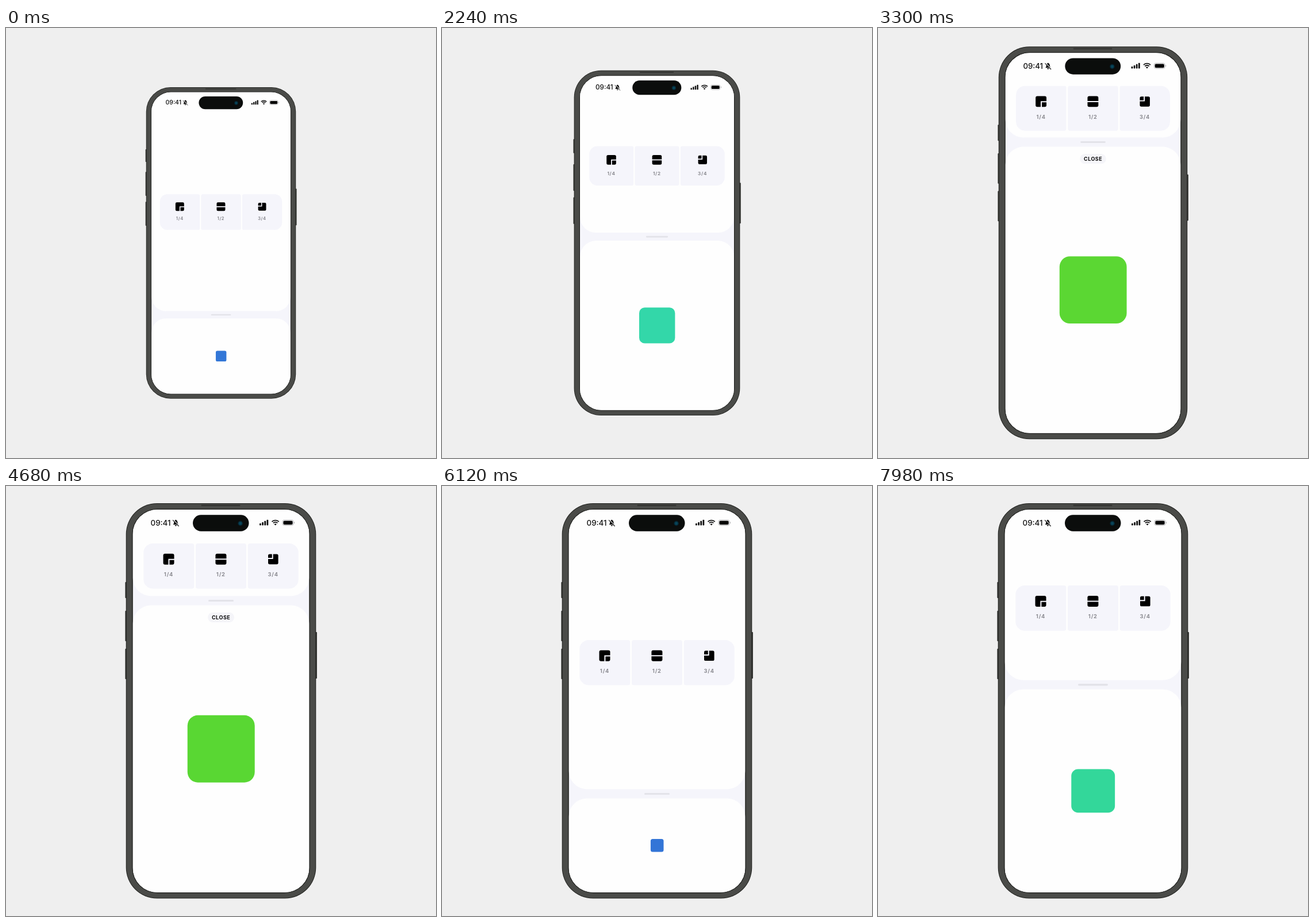
Animation, 748 px wide and 748 px high, one loop 8000 ms. Source, as an HTML page with a canvas:

```html
<!DOCTYPE html>
<html lang="en">
<head>
<meta charset="utf-8">
<title>Split view</title>
<style>
  html, body { margin: 0; width: 100%; height: 100%; overflow: hidden; background: #efefef; }
  canvas { display: block; width: 748px; height: 748px; }
</style>
</head>
<body>
<canvas id="stage"></canvas>
<script>
const SIZE = 748, MID = SIZE / 2, LOOP = 8000;
const canvas = document.getElementById('stage');
const dpr = window.devicePixelRatio || 1;
canvas.width = canvas.height = Math.round(SIZE * dpr);
const ctx = canvas.getContext('2d');

const SCREEN = { x: 220.5, y: 41, w: 307, h: 666 };
const BOTTOM = SCREEN.y + SCREEN.h;
const QUARTER = SCREEN.h * 0.25, HALF = SCREEN.h * 0.5, MOST = SCREEN.h * 0.75;
const TINT = '#f5f5fb', WHITE = '#fefefe';

const clamp = (v, a = 0, b = 1) => Math.min(b, Math.max(a, v));
const lerp = (a, b, p) => a + (b - a) * p;

// Underdamped spring response, time in ms.
function spring(t, stiffness = 500, damping = 30) {
  if (t <= 0) return 0;
  if (t > 500) return 1;
  const w = Math.sqrt(stiffness), z = damping / (2 * w);
  const k = Math.sqrt(1 - z * z), s = t / 1000, a = w * k * s;
  return 1 - Math.exp(-z * w * s) * (Math.cos(a) + z / k * Math.sin(a));
}

const easeOut = (x, power) => 1 - Math.pow(1 - clamp(x), power);

// Smooth curve through [time, value] points.
function curve(points, t) {
  const last = points.length - 1;
  if (t <= points[0][0]) return points[0][1];
  if (t >= points[last][0]) return points[last][1];
  const i = points.findIndex(p => p[0] > t) - 1;
  const slope = j => {
    if (j === 0) return 0;
    const a = points[j - 1], b = points[Math.min(last, j + 1)];
    return (b[1] - a[1]) / (b[0] - a[0]);
  };
  const [t0, v0] = points[i], [t1, v1] = points[i + 1];
  const d = t1 - t0, u = (t - t0) / d, u2 = u * u, u3 = u2 * u;
  return v0 * (2 * u3 - 3 * u2 + 1) + slope(i) * d * (u3 - 2 * u2 + u)
       + v1 * (3 * u2 - 2 * u3) + slope(i + 1) * d * (u3 - u2);
}

const SNAPS = [[1985, QUARTER, HALF], [3017, HALF, MOST], [4700, MOST, HALF], [5847, HALF, QUARTER]];
const DRAG = [[7105, QUARTER], [7200, 185], [7480, 253.5], [7800, 326], [7920, 347], [8000, 355]];

function panelHeight(t) {
  if (t > DRAG[0][0]) return curve(DRAG, t);
  let h = QUARTER;
  for (const [start, from, to] of SNAPS) if (t > start) h = lerp(from, to, spring(t - start));
  return h;
}

function zoom(t) {
  if (t < 2990) return lerp(0.788, 0.905, easeOut((t - 1980) / 500, 1.764));
  return lerp(0.905, 1, easeOut((t - 2980) / 500, 2.6));
}

function hue(h) {
  return h < HALF ? lerp(215, 165, (h - QUARTER) / (HALF - QUARTER))
                  : lerp(165, 106, (h - HALF) / (MOST - HALF));
}

function box(x, y, w, h, r, fill) {
  ctx.beginPath();
  ctx.roundRect(x, y, w, h, r);
  if (fill) { ctx.fillStyle = fill; ctx.fill(); }
}

function line(points, width, color) {
  ctx.beginPath();
  points.forEach(([x, y]) => ctx.lineTo(x, y));
  ctx.lineWidth = width;
  ctx.strokeStyle = color;
  ctx.stroke();
}

function label(text, x, y, font, color, spacing = 0, align = 'center') {
  ctx.font = font + ' Inter, sans-serif';
  ctx.letterSpacing = spacing + 'px';
  ctx.textAlign = align;
  ctx.textBaseline = 'alphabetic';
  ctx.fillStyle = color;
  ctx.fillText(text, x, y);
}

function drawBody() {
  const side = '#3a3b38', edge = '#1f201d';
  for (const [y, h] of [[167, 28], [217, 53], [283, 53]]) box(207.3, y, 4, h, 1, side);
  box(537.7, 254, 3.3, 81, 1, side);
  box(208.7, 30, 330.6, 687.6, 54, edge);
  box(209.7, 31, 328.6, 685.6, 53, '#4a4b48');
  box(339.5, 32.6, 68, 2.4, 1.2, '#343532');
  box(219.3, 39.8, 309.4, 668.4, 44.2, edge);
}

function drawBell() {
  ctx.fillStyle = '#111';
  ctx.beginPath();
  ctx.moveTo(290.8, 67.2);
  ctx.quadraticCurveTo(292.3, 65.8, 292.3, 62.6);
  ctx.quadraticCurveTo(292.5, 59.6, 295.3, 58.4);
  ctx.quadraticCurveTo(298.2, 59.6, 298.4, 62.6);
  ctx.quadraticCurveTo(298.4, 65.8, 299.9, 67.2);
  ctx.fill();
  ctx.beginPath();
  ctx.arc(295.3, 68, 1.7, 0, Math.PI);
  ctx.fill();
  line([[290.6, 58.6], [301, 69.2]], 1.5, WHITE);
  line([[290, 59.2], [300.6, 70]], 1.1, '#111');
}

function drawStatus() {
  label('09:41', 251.6, 68.5, '500 13.3px', '#111', 0, 'left');
  drawBell();
  for (let i = 0; i < 4; i++) {
    const h = 3.6 + i * 2.1;
    box(441 + i * 4.15, 68.6 - h, 2.8, h, 0.8, '#111');
  }
  ctx.strokeStyle = '#111';
  ctx.lineWidth = 1.9;
  for (const r of [8.6, 5.3]) {
    ctx.beginPath();
    ctx.arc(468.6, 68.2, r, -Math.PI * 0.75, -Math.PI * 0.25);
    ctx.stroke();
  }
  ctx.beginPath();
  ctx.moveTo(468.6, 68.6);
  ctx.arc(468.6, 68.6, 3, -Math.PI * 0.75, -Math.PI * 0.25);
  ctx.fillStyle = '#111';
  ctx.fill();
  box(481, 59, 19, 9.6, 3.2);
  ctx.lineWidth = 0.9;
  ctx.strokeStyle = '#b4b4b6';
  ctx.stroke();
  box(501, 62.3, 1, 3, 0.5, '#b4b4b6');
  box(482.4, 60.4, 16.2, 6.8, 1.9, '#050505');
}

function drawIsland() {
  box(325, 50.3, 97.5, 28.4, 14.2, '#0b0d0c');
  for (const [r, color] of [[4.4, '#06202b'], [3.1, '#073d50'], [1.4, '#0b4a5e']]) {
    ctx.beginPath();
    ctx.arc(407.6, 65, r, 0, Math.PI * 2);
    ctx.fillStyle = color;
    ctx.fill();
  }
}

function drawTiles(cy) {
  const top = cy - 39.3, big = 16, small = 3.5;
  const corners = [[big, small, small, big], small, [small, big, big, small]];
  ['1/4', '1/2', '3/4'].forEach((text, i) => {
    box(239.2 + i * 90.8, top, 88, 78.6, corners[i], TINT);
    label(text, 283 + i * 90.8, cy + 18.1, '700 9.3px', '#8b8b91', 0.8);
  });
  const y = cy - 21.4;
  box(273.5, y, 19, 19, 3, '#000');
  line([[294, y + 9.8], [283.4, y + 9.8], [283.4, y + 20]], 2, TINT);
  box(364.4, y, 19, 19, 3, '#000');
  line([[363, y + 9.5], [385, y + 9.5]], 2, TINT);
  box(456, y + 0.7, 17.6, 17.6, 2.6, '#000');
  line([[455, y + 8.2], [463.7, y + 8.2], [463.7, y - 0.5]], 2, TINT);
}

function drawClose(t, cardTop) {
  const p = spring(t - 3017) * (1 - clamp(spring(t - 4690)));
  if (p <= 0.01) return;
  const y = cardTop + lerp(6, 21, p);
  ctx.globalAlpha = clamp(p);
  box(351, y - 8.7, 46, 17.4, 8.7, '#f5f5f9');
  label('CLOSE', 374.1, y + 3.3, '700 9px', '#0a0a0a', 0.5);
  ctx.globalAlpha = 1;
}

function drawScreen(t) {
  const h = panelHeight(t);
  const cardTop = BOTTOM - h, sheetEnd = cardTop - 16;
  ctx.save();
  box(SCREEN.x, SCREEN.y, SCREEN.w, SCREEN.h, 43);
  ctx.clip();
  ctx.fillStyle = TINT;
  ctx.fillRect(SCREEN.x, SCREEN.y, SCREEN.w, SCREEN.h);
  box(SCREEN.x, SCREEN.y, SCREEN.w, sheetEnd - SCREEN.y, [0, 0, 32, 32], WHITE);
  box(SCREEN.x, cardTop, SCREEN.w, h, [32, 32, 0, 0], WHITE);

  const grab = spring(t - 7110);
  const gw = lerp(44, 52, grab), gh = lerp(3, 3.6, grab);
  box(MID - gw / 2, cardTop - 8 - gh / 2, gw, gh, gh / 2, '#e3e3e9');

  drawTiles((sheetEnd + 87) / 2);

  const size = 23.4 + 0.281 * (h - QUARTER);
  box(MID + 0.2 - size / 2, BOTTOM - h / 2 - size / 2, size, size, size * 0.155, `hsl(${hue(h)}, 67%, 52%)`);
  drawClose(t, cardTop);
  drawStatus();
  drawIsland();
  ctx.restore();
}

function render(t) {
  ctx.setTransform(dpr, 0, 0, dpr, 0, 0);
  ctx.fillStyle = '#efefef';
  ctx.fillRect(0, 0, SIZE, SIZE);
  const s = zoom(t);
  ctx.translate(MID, MID);
  ctx.scale(s, s);
  ctx.translate(-MID, -MID);
  drawBody();
  drawScreen(t);
}

const start = performance.now();
function tick() {
  render((performance.now() - start) % LOOP);
  requestAnimationFrame(tick);
}
tick();
</script>
</body>
</html>
```
